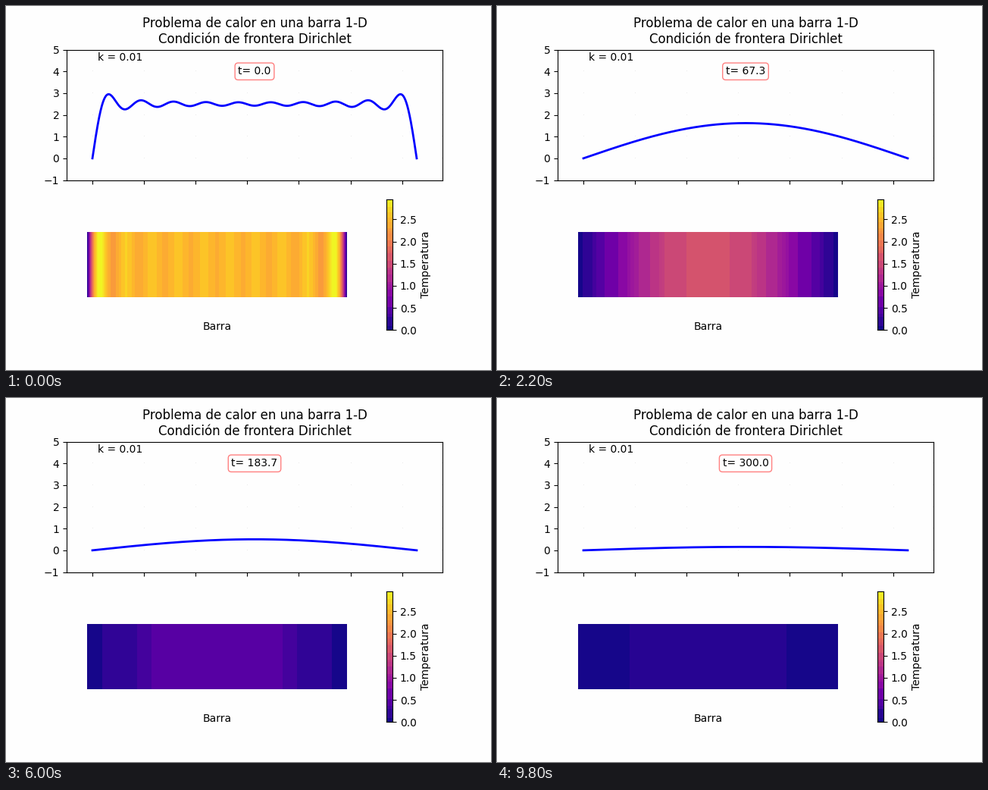
These frames come from a looping animation (640 by 480 pixels, 10000 ms). A matplotlib script:

```python
import numpy as np
import matplotlib.pyplot as plt
from matplotlib.animation import FuncAnimation

W, H, DPI = 640, 480, 100
FRAMES, INTERVAL = 50, 200
K, U0, TERMS = 0.01, 2.5, 10
LENGTH = 2 * np.pi
PAPER = "#fefefe"
PLASMA = plt.get_cmap("plasma")

# Pixel geometry of the bar and of the colour scale
BAR_X, BAR_TOP, BAR_W, BAR_H = 107, 298, 343, 86
SCALE_X, SCALE_TOP, SCALE_W, SCALE_H = 502, 255, 8, 172

times = np.linspace(0, 300, FRAMES)
modes = 2 * np.arange(TERMS) + 1


def heat(x, t):
    """Fourier solution with both ends held at zero."""
    amp = 4 * U0 / (np.pi * modes) * np.exp(-K * modes**2 * t)
    return amp @ np.sin(np.outer(modes, x / 2))


x = np.linspace(0, LENGTH, 1000)
u_max = heat(x, 0).max()


def colours(u):
    return PLASMA(np.clip(u / u_max, 0, 1), bytes=True)[:, :3].astype(int)


def reduce_colours(rgb, weight):
    """Merge colours sharing a 3-4-3 bit cell into their weighted mean."""
    r, g, b = rgb.T
    key = ((r >> 5) << 7) | ((g >> 4) << 3) | (b >> 5)
    _, cell = np.unique(key, return_inverse=True)
    total = np.bincount(cell, weight)
    mean = [np.bincount(cell, weight * c) / total for c in (r, g, b)]
    return np.stack(mean, axis=1)[cell].astype(np.uint8)


bar_x = (np.arange(BAR_W) + 0.5) / BAR_W * LENGTH
scale_rgb = colours((1 - (np.arange(SCALE_H) + 0.5) / SCALE_H) * u_max)
weight = np.repeat([BAR_H, SCALE_W], [BAR_W, SCALE_H]).astype(float)


def strips(t):
    rgb = np.vstack([colours(heat(bar_x, t)), scale_rgb])
    rgb = reduce_colours(rgb, weight)
    bar = np.tile(rgb[None, :BAR_W], (BAR_H, 1, 1))
    scale = np.tile(rgb[BAR_W:, None], (1, SCALE_W, 1))
    return bar, scale


fig = plt.figure(figsize=(W / DPI, H / DPI), dpi=DPI, facecolor=PAPER)
row = 0.77 / 2.15
ax = fig.add_axes([0.125, 0.88 - row, 0.775, row], facecolor=PAPER)
ax.set(xlim=(-0.5, LENGTH + 0.5), ylim=(-1, 5),
       xticks=range(7), yticks=range(-1, 6))
ax.tick_params(labelbottom=False)
ax.set_title("Problema de calor en una barra 1-D\n"
             "Condición de frontera Dirichlet")
dot_x, dot_y = np.meshgrid([*range(7), LENGTH + 0.49], range(5))
ax.plot(dot_x.ravel(), dot_y.ravel(), ",", color="#eaeaea", zorder=1)
ax.text(0.1, 4.5, "k = 0.01")
curve, = ax.plot(x, heat(x, 0), color="blue", lw=2)
clock = ax.text(np.pi, 4, "", ha="center", va="center",
                bbox=dict(boxstyle="round", fc=PAPER, ec=(1, 0.5, 0.5)))

fig.text(0.435, 0.11, "Barra", ha="center")

cax = fig.add_axes([0.78375, 0.11, row * H / 20 / W, row], facecolor="none")
cax.set(xticks=[], ylim=(0, u_max), yticks=np.arange(0, 2.6, 0.5))
cax.yaxis.tick_right()
cax.yaxis.set_label_position("right")
cax.set_ylabel("Temperatura")

bar0, scale0 = strips(0)
bar_im = fig.figimage(bar0, BAR_X, H - BAR_TOP - BAR_H, zorder=-1)
scale_im = fig.figimage(scale0, SCALE_X, H - SCALE_TOP - SCALE_H, zorder=-1)


def draw(i):
    t = times[i]
    curve.set_ydata(heat(x, t))
    clock.set_text(f"t= {t:.1f}")
    bar, scale = strips(t)
    bar_im.set_data(bar)
    scale_im.set_data(scale)
    return curve, clock, bar_im, scale_im


anim = FuncAnimation(fig, draw, frames=FRAMES, interval=INTERVAL,
                     init_func=lambda: draw(0), repeat=True, repeat_delay=0)
plt.show()
```
